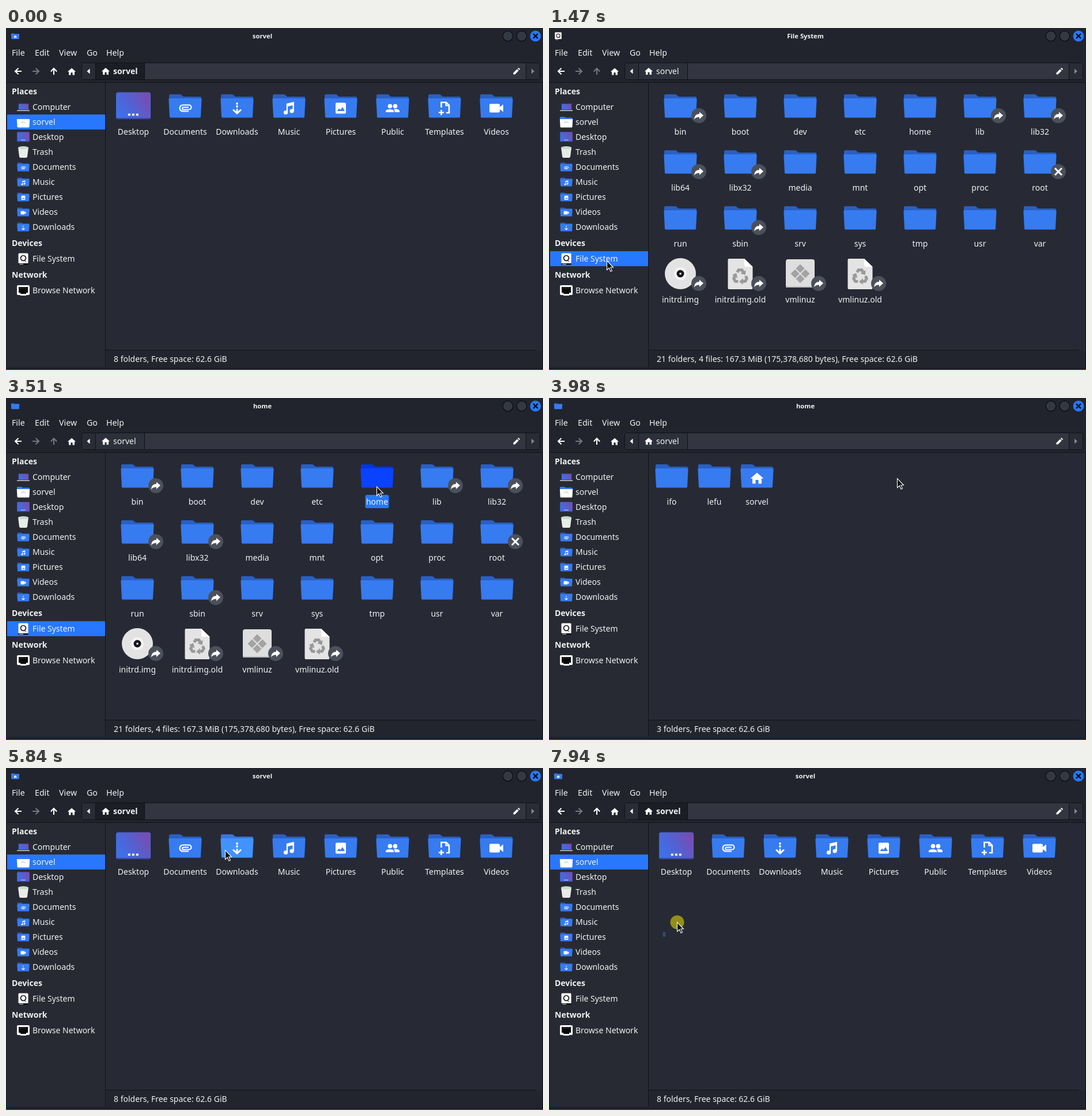
An HTML page that plays this animation: 932 by 593 pixels, repeating every 8 s.

```html
<!DOCTYPE html>
<html lang="en">
<head>
<meta charset="utf-8">
<title>File manager</title>
<style>
html, body { margin: 0; width: 100%; height: 100%; overflow: hidden; background: #21242c; }
svg { display: block; width: 932px; height: 593px; }
text { font: 14px "Noto Sans", sans-serif; fill: #f1f2f4; white-space: pre; }
.b { font-weight: 700; }
.title { font-size: 11.3px; font-weight: 700; }
.m { font-size: 14.2px; }
.c { text-anchor: middle; }
.back { fill: #2a5fc3; }
.front { fill: #367bf0; }
.hover .back { fill: #3a76de; }
.hover .front { fill: #4292ff; }
.picked .back { fill: #0535e0; }
.picked .front { fill: #0a42ff; }
.tag { display: none; }
.picked .tag { display: block; }
.w { fill: #fff; }
.l { fill: none; stroke: #fff; stroke-width: 2.2; }
</style>
</head>
<body>
<svg id="stage" viewBox="0 0 932 593" xmlns="http://www.w3.org/2000/svg"></svg>
<script>
const USER = 'sorvel', LOOP = 8000;
const stage = document.getElementById('stage');
const $ = id => document.getElementById(id);

const rect = (x, y, w, h, fill, more = '') =>
  `<rect x="${x}" y="${y}" width="${w}" height="${h}" fill="${fill}" ${more}/>`;
const circle = (x, y, r, fill, more = '') =>
  `<circle cx="${x}" cy="${y}" r="${r}" fill="${fill}" ${more}/>`;
const path = (d, more = 'class="w"') => `<path d="${d}" ${more}/>`;
const text = (x, y, s, cls = '', id = '') => `<text x="${x}" y="${y}" class="${cls}" id="${id}">${s}</text>`;
const at = (x, y, s, body, more = '') => `<g transform="translate(${x} ${y}) scale(${s})" ${more}>${body}</g>`;

const house = path('M0-9.5L11.5 .5H8V9.5H2.5V3H-2.5V9.5H-8V.5H-11.5Z');
const glyphs = {
  none: '',
  house,
  Documents: path('M6 5.5H-4a5.5 5.5 0 0 1 0-11H6.5a4 4 0 0 1 0 8H-3a2 2 0 0 1 0-4H6', 'class="l"'),
  Downloads: circle(0, -8, 1.9, '#fff') + circle(0, -3, 1.9, '#fff') +
    path('M0 1V9M-7 2.5L0 9L7 2.5', 'class="l" style="stroke-width:2.8"'),
  Music: circle(-5.5, 7.5, 3.6, '#fff') + circle(5, 5, 3.6, '#fff') + path('M-4.2 7.5V-8L9-11V5H6.4V-5L-1.9-3V7.5Z'),
  Pictures: rect(-9, -9.5, 18, 19, '#fff', 'rx="2"') + path('M-6.5 5L-3 .5L-.5 3L3-2L7 5Z', 'class="front"'),
  Public: circle(-4.5, -3.5, 3.8, '#fff') + circle(4.5, -3.5, 3.8, '#fff') +
    path('M-12 7V5C-12 1 2 1 2 5V7ZM3.5 7V5Q3.5 3 2 1.8C6 1 12 2 12 5V7Z'),
  Templates: path('M-5.5-1V-10H3L8-5V8H3M-5.5 3V12M-10 7.5H-1', 'class="l" style="stroke-width:2.6"') +
    path('M2.5-10V-4.5H8', 'class="l"'),
  Videos: path('M-10-7.5H4Q6-7.5 6-5.5V-2L12-6.5V6.5L6 2V5.5Q6 7.5 4 7.5H-10Q-12 7.5-12 5.5V-5.5Q-12-7.5-10-7.5Z')
};

const folderShape =
  path('M-28 2Q-28 0-26 0H-9Q-7.5 0-6.5 1L-3 4H26Q28 4 28 6V20H-28Z', 'class="back"') +
  path('M-28.6 8.5Q-28.6 7-27 7H27Q28.6 7 28.6 8.5L27 39Q26.900 40.600 25 40.600H-25Q-26.900 40.600-27 39Z', 'class="front"');
const folder = (x, y, s, glyph = 'none') => at(x, y, s, folderShape + at(0, 24, 1, glyphs[glyph]));

const desktop = (x, y, s) => at(x, y, s,
  rect(-29.5, 0, 59, 45.5, 'url(#wall)', 'rx="2.5" stroke="#4b6bd0"') + rect(-29, 44, 58, 1.5, '#3a3f9a') +
  [-7, 0, 7].map(d => rect(d - 2.2, 36.5, 4, 3.5, '#fff')).join(''));
const drive = (x, y, s) => at(x, y, s,
  rect(-8.5, -9.5, 17, 18, '#fff', 'rx="1.5"') + circle(0, -1, 4.5, '#fff', 'stroke="#15171c" stroke-width="1.7"') +
  rect(-8.5, 8, 17, 2.5, '#0c0d10') + rect(-7, 9, 7, 1, '#d8d8d8') + path('M2 3L5 5.5', 'stroke="#15171c"'));

const emblem = (x, kind) => circle(x, 152, 13, '#4c505b') + (kind === 'x'
  ? path(`M${x - 6} 146l12 12m0-12l-12 12`, 'class="l" style="stroke-width:3"')
  : path(`M${x + 8} 151.5l-7-6v3.5q-8.5 0-9 9.5q3-4.5 9-4v3.5Z`));

const recycle = [0, 120, 240].map(a => `<g transform="rotate(${a})">` +
  path('M-5.5-7.5L-2.8-11.5H2.8L5-8', 'fill="none" stroke="#999" stroke-width="5"') +
  path('M0-5.500L9.500-11L8.800-2.800Z', 'fill="#999"') + '</g>').join('');
const diamonds = [[0, -9], [9, 0], [0, 9], [-9, 0]].map(([x, y]) =>
  path(`M${x} ${y - 7.5}l7.5 7.5l-7.5 7.5l-7.5-7.5Z`, 'fill="#a3a3a3"')).join('');
const files = {
  disc: circle(0, 0, 27, '#e3e3e3') + circle(0, 0, 11, '#f4f4f4') + circle(0, 0, 6.5, '#15171c') + circle(0, 0, 1.8, '#f4f4f4'),
  page: path('M-19.5-26H7L21.5-12V25Q21.5 27 19.5 27H-19.5Q-21.5 27-21.5 25V-24Q-21.5-26-19.5-26Z', 'fill="#e4e4e4"') +
    path('M7-26L21.5-12H9Q7-12 7-14Z', 'fill="#fff"') + at(0, 5, 1, recycle),
  box: rect(-25, -25, 50, 49, '#dedede', 'rx="4"') + rect(-25, 22, 50, 2, '#bdbdbd', 'rx="1"') + diamonds
};

const cells = [];
function cell(view, x, y, name, icon, width = 41) {
  const id = `cell${cells.length}`;
  cells.push({ id, view, x, y, name });
  return `<g id="${id}" transform="translate(0 ${y})">${icon}` +
    rect(x - width / 2, 168, width, 23, '#2777ff', 'rx="3" class="tag"') + text(x, 185, name, 'c') + '</g>';
}

const homeNames = ['Desktop', 'Documents', 'Downloads', 'Music', 'Pictures', 'Public', 'Templates', 'Videos'];
const homeView = homeNames.map((n, i) => {
  const x = 221 + 90 * i;
  return cell('home', x, 0, n, i ? folder(x, 115, 1, n) : desktop(x, 112, 1));
}).join('');

const linked = ['bin', 'lib', 'lib32', 'lib64', 'libx32', 'sbin'];
const rootNames = ('bin boot dev etc home lib lib32 lib64 libx32 media mnt opt proc root ' +
  'run sbin srv sys tmp usr var initrd.img initrd.img.old vmlinuz vmlinuz.old').split(' ');
const fileKinds = ['disc', 'page', 'box', 'page'];
const rootView = rootNames.map((n, i) => {
  const x = 228 + 104 * (i % 7), y = 97 * Math.floor(i / 7);
  let icon = i < 21 ? folder(x, 115, 1) : at(x, 135, 1, files[fileKinds[i - 21]]);
  if (i > 20 || linked.includes(n)) icon += emblem(x + 32, 'link');
  if (n === 'root') icon += emblem(x + 32, 'x');
  return cell('root', x, y, n, icon);
}).join('');

const userView = ['ifo', 'lefu', USER].map((n, i) => {
  const x = 213 + 74 * i;
  return cell('users', x, 0, n, folder(x, 115, 1, i === 2 ? 'house' : 'none'), 48);
}).join('');

// Sidebar
const row = (y, label, icon) => icon + text(46, y + 5, label);
const laptop = rect(21.5, 131, 18, 11, 'url(#wall)', 'stroke="#30343f"') + rect(19, 142.5, 22, 1.5, '#c9ccd2');
const userFolder = path('M19 157V155Q19 154 20 154H27L29 155.5H39.5Q41 155.5 41 157V160H19Z', 'fill="#367bf0"') +
  path('M18.8 158H41.2L40.5 171Q40.4 172.5 39 172.5H21Q19.6 172.5 19.5 171Z') +
  path('M26 164.5Q30 161.5 34 164.5', 'fill="none" stroke="#c9ced8" stroke-width="1.5"');
const trash = path('M21 207L23 223Q23.3 225 25.5 225H34.5Q36.7 225 37 223L39 207Z', 'fill="#e9ece6"') +
  '<ellipse cx="30" cy="207.5" rx="9" ry="2.6" fill="#c5dccb"/>';
const port = rect(19, 446, 22, 17, '#fff', 'rx="2"') + path('M22 449H38V459H35V461H25V459H22Z', 'fill="#08090b"') +
  path('M25 449v3m3-3v3m3-3v3m3-3v3', 'stroke="#555" stroke-width=".8"') + rect(25, 462, 10, 2, '#fff');
const sidebar = text(10, 115, 'Places', 'b') + row(137, 'Computer', laptop) + row(163, USER, userFolder) +
  row(189, 'Desktop', desktop(30, 180.5, .36)) + row(215, 'Trash', trash) +
  ['Documents', 'Music', 'Pictures', 'Videos', 'Downloads'].map((n, i) =>
    row(241 + 26 * i, n, folder(30, 233.5 + 26 * i, .37, n))).join('') +
  text(10, 378, 'Devices', 'b') + row(400, 'File System', drive(30, 400, 1)) +
  text(10, 433, 'Network', 'b') + row(455, 'Browse Network', port);

// Toolbar
const arrow = (x, turn, col, id = '') => `<path id="${id}" transform="translate(${x} 75) rotate(${turn})" ` +
  `d="M6 0H-5M.5-5.2L-5 0L.5 5.2" fill="none" stroke="${col}" stroke-width="2.1"/>`;
const pathBar = `<g id="bar">` +
  rect(131.5, 60.5, 795, 29, '#333641', 'rx="3" stroke="#0f1116"') + rect(132, 61, 23, 28, '#292c36', 'rx="2"') +
  rect(156, 61, 84, 28, '#1b1e25', 'id="seg"') + rect(903, 61, 23, 28, '#292c35', 'rx="2"') +
  path('M155.5 61V89M240.5 61V89M902.5 61V89', 'stroke="#0f1116"') +
  path('M145.5 70.5V79.5L140.5 75Z') + path('M912 70.5V79.5L917 75Z', 'fill="#858892"') +
  at(173, 75, .62, house) + text(186, 80, USER, 'b', 'crumb') +
  path('M880.5 80.5V77.7L887 71.2L889.8 74L883.3 80.5ZM888 70.2L889.5 68.8L892.2 71.5L890.8 73Z') + '</g>';
const editBar = `<g id="edit">` +
  rect(131.5, 61.5, 794, 28, '#1c1f27', 'rx="3" stroke="#2777ff" stroke-width="1.3"') +
  folder(147, 69.5, .25, 'house') + rect(161, 66, 0, 19, '#2777ff', 'id="mark"') +
  text(161, 81, `/home/${USER}/`, '', 'entry') + rect(253, 66, 1.2, 19, '#fff', 'id="caret"') +
  path('M914.5 71.5A5.8 5.8 0 1 0 915.8 76', 'class="l" style="stroke-width:1.8"') + path('M916.5 68.5V74H911Z') + '</g>';

const button = (x, fill, edge = '#0b0c0f') => circle(x, 14, 8.8, fill, `stroke="${edge}" stroke-width="1.2"`);

stage.innerHTML = `<defs><linearGradient id="wall" x1="0" y1=".75" x2="1" y2=".25">
<stop offset="0" stop-color="#3c72ec"/><stop offset=".45" stop-color="#5162d4"/><stop offset="1" stop-color="#7b4bb2"/></linearGradient></defs>` +
  rect(0, 0, 932, 593, '#21242c') +
  rect(2, 95, 170, 492, '#282a33') + rect(173, 95, 758, 464, '#272a34') + rect(173, 559, 758, 28, '#23252e') +
  path('M0 94.5H932M172.5 95V587M173 558.5H920M931.5 95V590', 'stroke="#101217"') +
  rect(0, 590, 932, 1.5, '#0d0f14') + rect(0, 591.5, 932, 1.5, '#1b4f9e') +
  `<g id="icon-home">${folder(16, 9, .25, 'house')}</g><g id="icon-root">${drive(16, 14, .68)}</g>` +
  `<g id="icon-users">${folder(16, 9, .25)}</g>` + text(445, 18, USER, 'title c', 'title') +
  button(871, '#343843') + button(895, '#343843') + button(919, '#2777ff', '#2777ff') +
  path('M915 10l8 8m0-8l-8 8', 'stroke="#0b0c10" stroke-width="2.4"') +
  [[10, 'File'], [50, 'Edit'], [92, 'View'], [140, 'Go'], [174, 'Help']].map(([x, s]) => text(x, 48, s, 'm')).join('') +
  arrow(21, 0, '#fff') + arrow(52, 180, '#747781') + arrow(83, 90, '#fff', 'up') + at(114, 75.5, .62, house) +
  pathBar + editBar + rect(2, 150, 170, 26, '#2777ff', 'id="selected"') + sidebar +
  `<g id="home">${homeView}</g><g id="root">${rootView}</g><g id="users">${userView}</g>` +
  text(187, 579, '', '', 'status') +
  rect(198.5, 285.5, 3, 6, '#1c3c66', 'id="band" stroke="#2a66b0"') +
  `<g id="cursor">${circle(.5, .5, 12, '#938f18', 'id="press"')}` +
  path('M.5 .5V16.5L4.2 13L6.9 19L9.4 17.9L6.8 12H11.5Z', 'id="pointer" fill="#0b0c0f" stroke="#fff" stroke-width="1.1"') +
  path('M-3-8Q0-8 0-6Q0-8 3-8M0-6V7M-3 9Q0 9 0 7Q0 9 3 9', 'id="beam" fill="none" stroke="#fff" stroke-width="1.5"') + '</g>';

// Pointer stops: time, x, y, eased
const stops = [
  [70, 395, 434], [400, 395, 434], [1190, 100, 403, 1], [2070, 100, 403], [2180, 215, 412], [2330, 328, 261],
  [2820, 488, 192], [2890, 488, 192], [3230, 643, 153, 1], [3910, 643, 153], [4170, 500, 102], [4450, 385, 148],
  [5720, 385, 148], [6380, 329, 84, 1], [6520, 329, 84], [6650, 311, 84], [6990, 150, 84], [7190, 150, 84],
  [7690, 200, 289, 1], [7800, 200, 289], [7940, 222, 267], [LOOP, 222, 267]
];
function pointerAt(t) {
  const i = stops.findIndex(s => s[0] > t);
  if (i < 1) return stops[0].slice(1, 3);
  const [t0, x0, y0] = stops[i - 1], [t1, x1, y1, eased] = stops[i];
  let k = (t - t0) / (t1 - t0);
  if (eased) k = k * k * (3 - 2 * k);
  return [Math.round(x0 + (x1 - x0) * k), Math.round(y0 + (y1 - y0) * k)];
}

const show = (id, on) => { $(id).style.display = on ? '' : 'none'; };
const put = (id, s) => { if ($(id).textContent !== s) $(id).textContent = s; };
const pick = (t, a, b, c, list) => list[t < a ? 0 : t < b ? 1 : t < c ? 2 : 0];
const within = (t, a, b) => t >= a && t < b;
const VIEWS = ['home', 'root', 'users'];
const TITLES = { home: USER, root: 'File System', users: 'home' };
const STATUS = {
  home: '8 folders', root: '21 folders, 4 files: 167.3 MiB (175,378,680 bytes)', users: '3 folders'
};

function selectText(x) {
  const entry = $('entry'), n = entry.getNumberOfChars();
  const end = entry.getEndPositionOfChar(n - 1).x;
  let caret = end;
  for (let i = n - 1; i >= 0; i--) {
    const p = entry.getStartPositionOfChar(i).x;
    if (x < (p + entry.getEndPositionOfChar(i).x) / 2) caret = p;
  }
  $('caret').setAttribute('x', caret - .5);
  $('mark').setAttribute('x', caret);
  $('mark').setAttribute('width', end - caret);
}

function draw(t) {
  const view = pick(t, 1400, 3580, 5250, VIEWS), head = pick(t, 1340, 3440, 5180, VIEWS);
  const [x, y] = pointerAt(t), edit = within(t, 6400, 7740);
  for (const v of VIEWS) {
    show(v, v === view);
    show('icon-' + v, v === head);
  }
  put('title', TITLES[head]);
  put('status', STATUS[view] + ', Free space: 62.6 GiB');
  $('crumb').setAttribute('class', view === 'home' ? 'b' : '');
  $('seg').setAttribute('fill', view === 'home' ? '#1b1e25' : '#2c303a');
  $('up').setAttribute('stroke', view === 'root' ? '#747781' : '#fff');
  show('selected', t < 1200 || view !== 'users');
  $('selected').setAttribute('y', within(t, 1200, 3580) ? 387 : 150);

  for (const c of cells) {
    if (c.view !== view) continue;
    const over = t >= 70 && Math.abs(x - c.x) < 29 && within(y - c.y, 114, 190);
    const picked = c.name === 'home' && within(t, 3300, 3580) ||
      c.view === 'users' && c.name === USER && within(t, 4900, 5250);
    $(c.id).setAttribute('class', picked ? 'picked' : over ? 'hover' : '');
  }

  show('bar', !edit);
  show('edit', edit);
  if (edit) selectText(t < 6520 ? 329 : t < 6990 ? x : 150);

  const beam = edit && y < 91;
  show('cursor', t >= 70);
  show('beam', beam);
  show('pointer', !beam);
  show('press', within(t, 6330, 6450) || within(t, 6520, 6990) || t >= 7720);
  show('band', t >= 7800);
  $('cursor').setAttribute('transform', `translate(${x} ${y})`);
}

const start = performance.now();
function tick(now) {
  draw(Math.max(0, now - start) % LOOP);
  requestAnimationFrame(tick);
}
draw(0);
requestAnimationFrame(tick);
</script>
</body>
</html>
```
